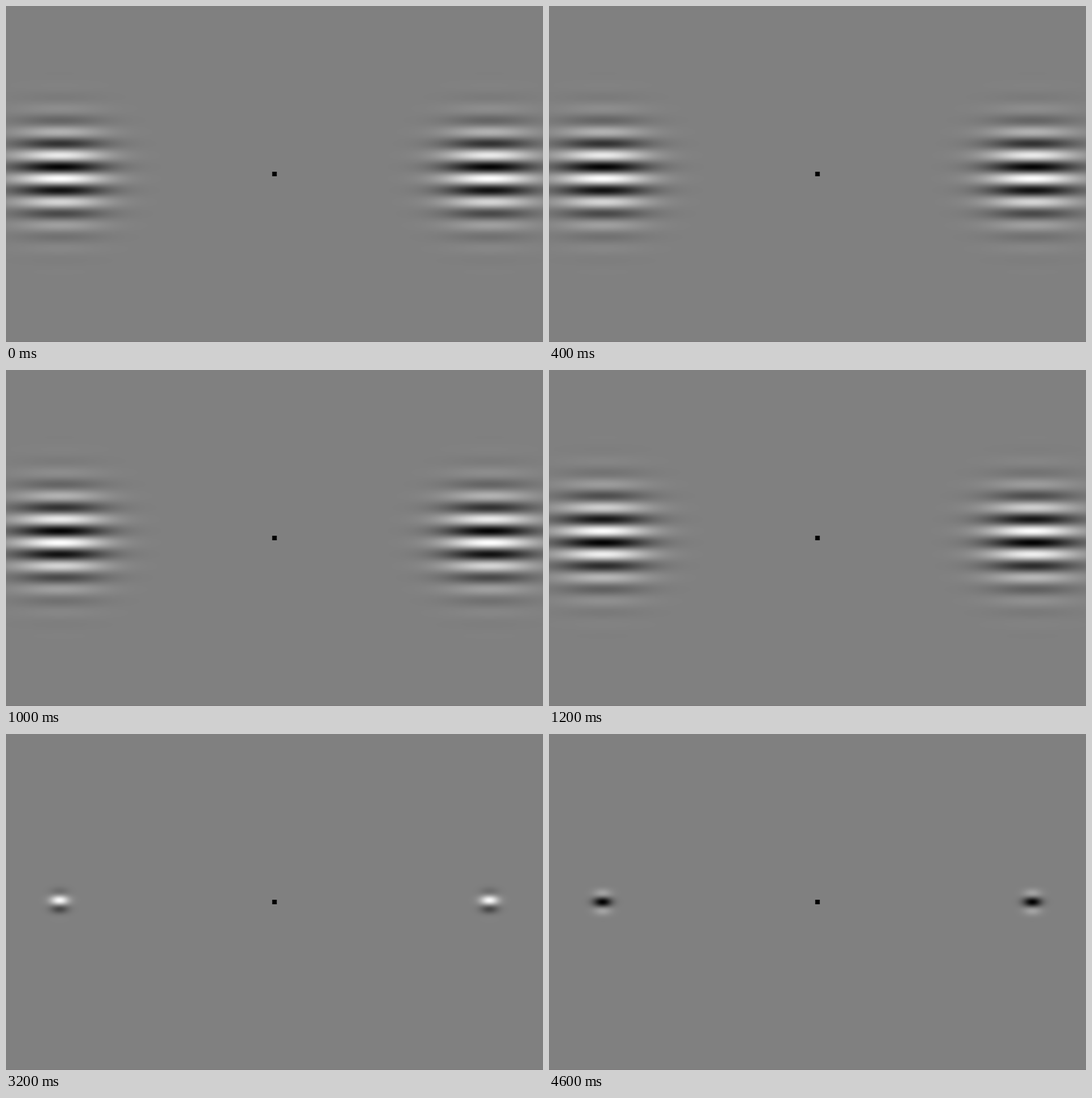
Animation of 947x592 px, one loop 4800 ms. Source, as an HTML page with a canvas:

```html
<!DOCTYPE html>
<html lang="en">
<head>
<meta charset="utf-8">
<title>Drifting gratings</title>
<style>
html, body { margin: 0; width: 100%; height: 100%; overflow: hidden; background: #808080; }
canvas { display: block; }
</style>
</head>
<body>
<canvas id="stage" width="947" height="592"></canvas>
<script>
const W = 947, H = 592, STEP = 200, LOOP = 4800;
const MID_X = W / 2, MID_Y = H / 2;
const OFFSET = 379;   // distance of each patch from the centre
const PERIOD = 41.75; // grating wavelength
const GRAY = 128;

// Phases in tenths of a cycle, one per 200 ms step.
const BURSTS = [
  { start: 0, sigma: 54.1, phases: [2, 7, 2, 9, 3, 2, 7, 8] },
  { start: 3200, sigma: 11.25, phases: [9, 5, 8, 3, 1, 2, 8, 5] }
];

const ctx = document.getElementById('stage').getContext('2d');
const image = ctx.createImageData(W, H);
const pixels = new Uint32Array(image.data.buffer);

const gauss = (d, sigma) => Math.exp(-d * d / (2 * sigma * sigma));

function drawPatches(sigma, phase) {
  const across = Float64Array.from({ length: W }, (_, x) => {
    const d = x + 0.5 - MID_X;
    return gauss(d - OFFSET, sigma) + gauss(d + OFFSET, sigma);
  });
  for (let y = 0; y < H; y++) {
    const d = y + 0.5 - MID_Y;
    const wave = 127 * gauss(d, sigma) * Math.cos(2 * Math.PI * (d / PERIOD - phase));
    for (let x = 0; x < W; x++) {
      const v = Math.round(GRAY + wave * across[x]);
      pixels[y * W + x] = 0xff000000 | v << 16 | v << 8 | v;
    }
  }
  ctx.putImageData(image, 0, 0);
}

function draw(step) {
  const time = step * STEP;
  const burst = BURSTS.find(b => time >= b.start && time < b.start + b.phases.length * STEP);
  if (burst) {
    drawPatches(burst.sigma, burst.phases[step - burst.start / STEP] / 10);
  } else {
    ctx.fillStyle = '#808080';
    ctx.fillRect(0, 0, W, H);
  }
  ctx.fillStyle = '#7d787b';
  ctx.fillRect(0, H - 1, W, 1);
  ctx.fillStyle = '#000';
  ctx.fillRect(MID_X - 4, MID_Y - 4, 8, 8);
}

const origin = performance.now();
let shown = -1;

function tick() {
  const step = Math.floor((performance.now() - origin) % LOOP / STEP);
  if (step !== shown) draw(shown = step);
  requestAnimationFrame(tick);
}
tick();
</script>
</body>
</html>
```
